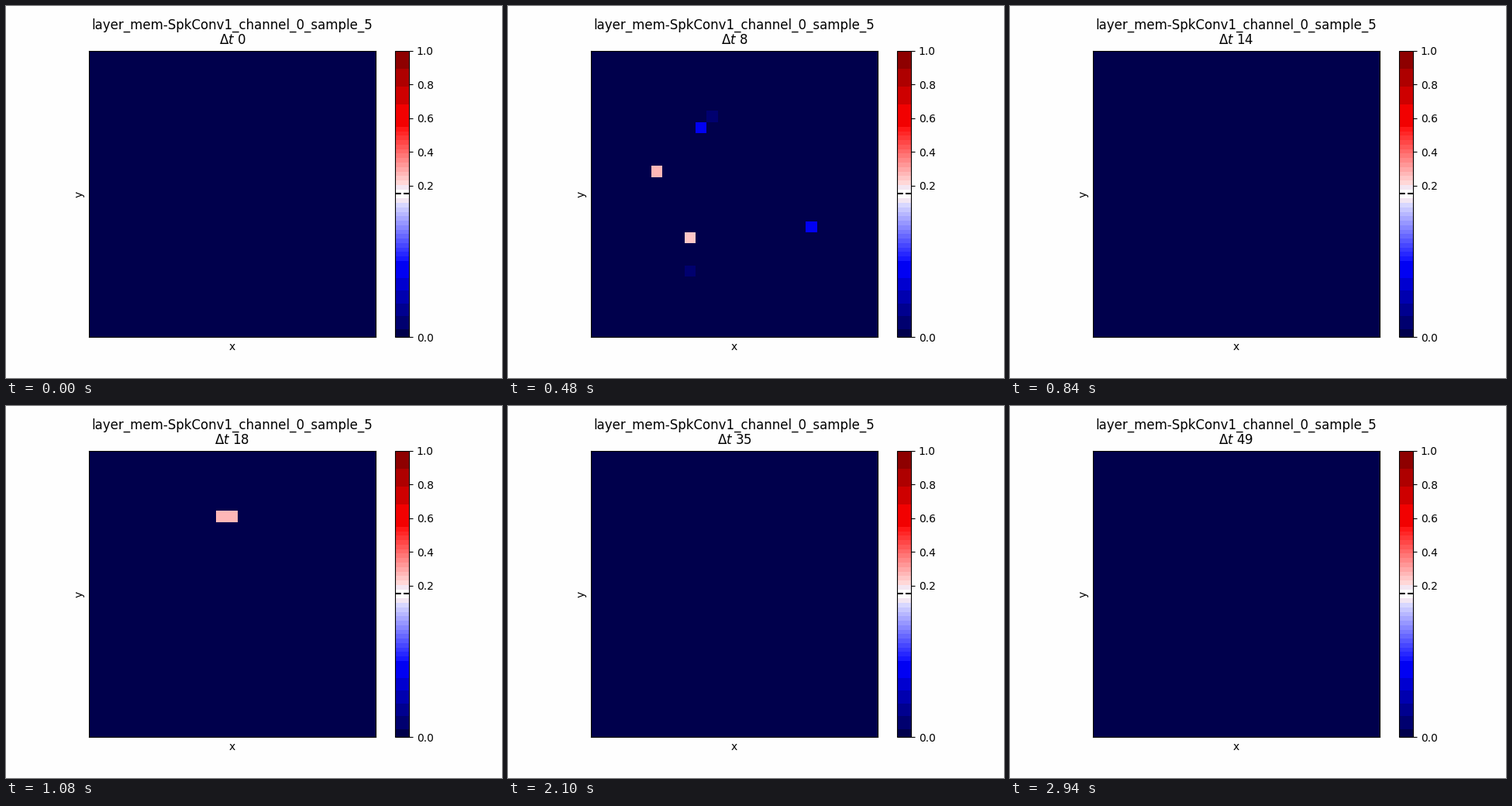
Recreate the animation shown at these times as a matplotlib script. Size 640 by 480 pixels, loop 3 s.

```python
import matplotlib.pyplot as plt
import numpy as np
from matplotlib.animation import FuncAnimation
from matplotlib.colors import ListedColormap, TwoSlopeNorm

STEPS, SIZE = 50, 27
THRESHOLD, DECAY = 0.15, 0.6
PAPER = "#fefefe"
HIGH, MID, LOW = 0.27, 0.242, 0.07

# step: (column, row from the bottom, input strength)
EVENTS = {
    5: [(10, 5, MID)],
    7: [(11, 20, HIGH), (9, 6, HIGH)],
    8: [(6, 15, HIGH), (9, 9, MID), (10, 19, LOW), (20, 10, LOW)],
    11: [(11, 7, MID), (18, 6, HIGH)],
    13: [(12, 4, MID)],
    18: [(12, 20, HIGH), (13, 20, HIGH)],
    45: [(6, 12, HIGH)],
    47: [(21, 14, MID)],
}


def banded_seismic():
    """Seismic map reduced to 3-4-3 bits, each band in its mean colour."""
    lut = plt.get_cmap("seismic")(np.arange(256))[:, :3] * 255
    lut = lut.round().astype(int)
    keys = lut >> [5, 4, 5]
    out = np.empty((256, 3))
    for key in np.unique(keys, axis=0):
        band = (keys == key).all(axis=1)
        out[band] = lut[band].mean(axis=0) // 1
    out[(keys == [7, 15, 7]).all(axis=1)] = 254
    out[(keys == keys[0]).all(axis=1)] = lut[0]
    return ListedColormap(out / 255)


def simulate():
    """Leaky integrate-and-fire cells with reset by subtraction."""
    mem = np.zeros((SIZE, SIZE))
    history = []
    for step in range(STEPS):
        fired = mem > THRESHOLD
        mem = np.clip(DECAY * mem - THRESHOLD * fired, 0, 1)
        for col, row, strength in EVENTS.get(step, []):
            mem[row, col] += strength
        history.append(mem)
    return history


def title(step):
    return f"layer_mem-SpkConv1_channel_0_sample_5\n$\\Delta t$ {step}"


history = simulate()
fig, ax = plt.subplots(figsize=(6.4, 4.8), dpi=100, facecolor=PAPER)
image = ax.imshow(history[0], cmap=banded_seismic(), interpolation="nearest",
                  origin="lower", norm=TwoSlopeNorm(THRESHOLD, 0, 1))
ax.set(xlim=(0, SIZE - 1), ylim=(0, SIZE - 1), xticks=[], yticks=[],
       xlabel="x", ylabel="y")
heading = ax.set_title(title(0), linespacing=1.06)

bar = fig.colorbar(image, ax=ax, ticks=[0, 0.2, 0.4, 0.6, 0.8, 1])
bar.ax.set_yticklabels(["0.0", "0.2", "0.4", "0.6", "0.8", "1.0"])
bar.ax.axhline(THRESHOLD, color="k", ls="--", lw=1.5)


def update(step):
    image.set_data(history[step])
    heading.set_text(title(step))
    return image, heading


anim = FuncAnimation(fig, update, frames=STEPS, interval=60,
                     repeat=True, repeat_delay=0)
plt.show()
```
